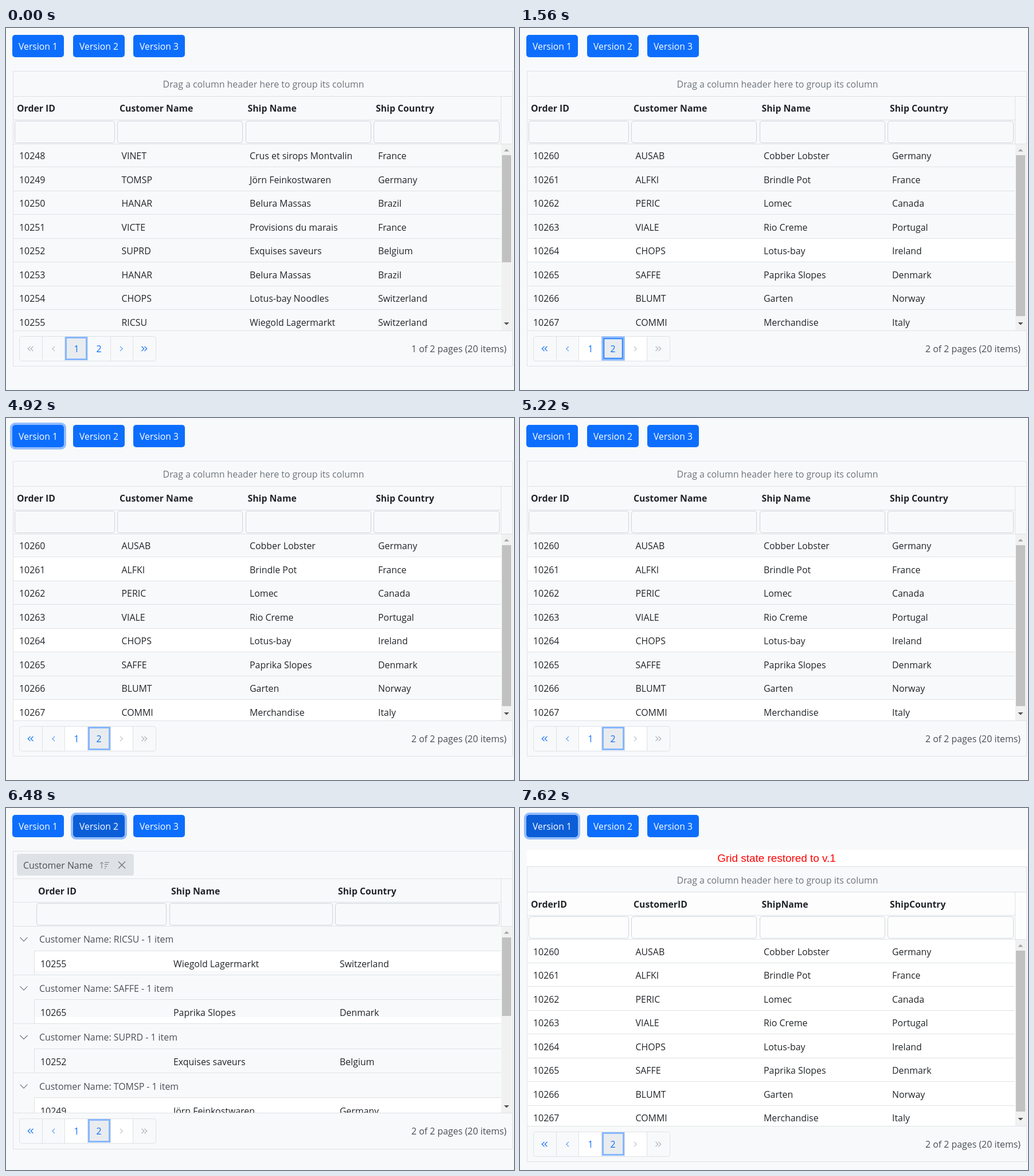
Animation, 886 px wide and 632 px high, one loop 8 s. Source, as an HTML page:

```html
<!DOCTYPE html>
<html lang="en">
<head>
<meta charset="utf-8">
<title>Grid state</title>
<style>
html, body { margin: 0; width: 100%; height: 100%; overflow: hidden; background: #f8f9fa; }
svg { display: block; width: 886px; height: 632px; }
text { font: 15.9px "Open Sans", "Noto Sans", sans-serif; fill: #212529; }
.head { font-weight: 700; font-size: 15.8px; }
.mid { text-anchor: middle; }
.end { text-anchor: end; }
.muted { fill: #6c757d; }
.soft { fill: #495057; }
.link { fill: #0d6efd; }
.label { fill: #fff; font-size: 15.7px; }
.note { font: 18.9px "Liberation Sans", Arial, sans-serif; fill: #f00; }
</style>
</head>
<body>
<svg id="stage" viewBox="0 0 886 632"></svg>
<script>
const LINE = '#dee2e6', BLUE = '#0d6efd', DARK = '#0b5ed7', RING = '#86b7fe', GLOW = '#94bdfc';
const LOOP = 8000, STEP = 60;
const stage = document.getElementById('stage');

// Strokes sit on pixel centres and baselines on whole pixels.
const snap = v => Math.floor(v) + .5;
const text = (x, y, s, cls = '') => `<text x="${x}" y="${Math.round(y)}" class="${cls}">${s}</text>`;
const rect = (x, y, w, h, fill, extra = '') =>
  `<rect x="${x}" y="${y}" width="${w}" height="${h}" fill="${fill}" ${extra}/>`;
const path = (d, color = LINE, width = 1, extra = '') =>
  `<path d="${d}" fill="none" stroke="${color}" stroke-width="${width}" ${extra}/>`;
const hLine = (x1, x2, y) => path(`M${x1} ${snap(y)}H${x2}`);
const vLine = (x, y1, y2) => path(`M${snap(x)} ${y1}V${y2}`);
const frame = (x, y, w, h, r, color = LINE, fill = 'none') =>
  rect(snap(x), snap(y), w, h, fill, `rx="${r}" stroke="${color}"`);

const page1 = [
  ['VINET', 'Crus et sirops Montvalin', 'France'],
  ['TOMSP', 'Jörn Feinkostwaren', 'Germany'],
  ['HANAR', 'Belura Massas', 'Brazil'],
  ['VICTE', 'Provisions du marais', 'France'],
  ['SUPRD', 'Exquises saveurs', 'Belgium'],
  ['HANAR', 'Belura Massas', 'Brazil'],
  ['CHOPS', 'Lotus-bay Noodles', 'Switzerland'],
  ['RICSU', 'Wiegold Lagermarkt', 'Switzerland']
].map((r, i) => [10248 + i, ...r]);

const page2 = [
  ['AUSAB', 'Cobber Lobster', 'Germany'],
  ['ALFKI', 'Brindle Pot', 'France'],
  ['PERIC', 'Lomec', 'Canada'],
  ['VIALE', 'Rio Creme', 'Portugal'],
  ['CHOPS', 'Lotus-bay', 'Ireland'],
  ['SAFFE', 'Paprika Slopes', 'Denmark'],
  ['BLUMT', 'Garten', 'Norway'],
  ['COMMI', 'Merchandise', 'Italy']
].map((r, i) => [10260 + i, ...r]);

const grouped = [
  ['RICSU', 10255, 'Wiegold Lagermarkt', 'Switzerland'],
  ['SAFFE', 10265, 'Paprika Slopes', 'Denmark'],
  ['SUPRD', 10252, 'Exquises saveurs', 'Belgium'],
  ['TOMSP', 10249, 'Jörn Feinkostwaren', 'Germany']
];

function scrollbar(top, bottom, thumb) {
  return rect(864, top, 18, bottom - top, '#f1f1f1') +
    rect(865, top + 19, 16, thumb, '#c1c1c1') +
    `<path d="M868.5 ${top + 12.5}l4.5-4.5 4.5 4.5z" fill="#a3a3a3"/>` +
    `<path d="M868.5 ${bottom - 14}l4.5 4.5 4.5-4.5z" fill="#505050"/>`;
}

function chevron(x, y, dir, double, on) {
  const d = (double ? [-2.5, 2.5] : [0])
    .map(o => `M${x + o - dir * 2} ${y - 4.2}l${dir * 4.2} 4.2l${-dir * 4.2} 4.2`).join('');
  const color = double ? (on ? BLUE : '#a9b0b7') : (on ? '#5c9bfd' : '#bcc2c8');
  return path(d, color, 1.2);
}

const pageBox = (x, y, fill, color, width) =>
  rect(x + 1.5, y + 2.5, 36, 38, fill, `stroke="${color}" stroke-width="${width}"`);

// y is the top edge of the pager box
function pager(y, page) {
  const mid = y + 22, second = page === 2;
  let s = '';
  if (second) s += rect(103, y + 1, 39, 42, '#fff') + rect(183, y + 1, 38, 42, '#fff');
  s += frame(23, y, 238, 43, 4);
  for (const x of [63, 102, 142, 182, 221]) s += vLine(x, y, y + 44);
  s += pageBox(second ? 143 : 103, y, '#e9ecef', RING, 3);
  return s + chevron(43, mid, -1, true, second) + chevron(83, mid, -1, false, second) +
    chevron(201, mid, 1, false, !second) + chevron(241, mid, 1, true, !second) +
    text(123, mid + 6, 1, 'mid link') + text(162, mid + 6, 2, 'mid link') +
    text(873, mid + 6, `${page} of 2 pages (20 items)`, 'end soft');
}

const inputs = (spans, y, fill = '#f8f9fa') =>
  spans.map(([a, b]) => frame(a, y, b - a, 38, 4, '#ced4da', fill)).join('');

const headX = [19, 198, 421.5, 645], cellX = [23, 201.5, 425, 649];

function flatGrid(rows, page, heads, thumb, dy = 0, fill) {
  const top = Math.floor(dy);
  let s = frame(12, 75 + top, 871, 515, 0) +
    text(449, 104 + dy, 'Drag a column header here to group its column', 'mid muted') +
    hLine(12, 884, 119 + dy) + hLine(12, 863, 160 + dy) + hLine(12, 884, 202 + dy) +
    vLine(863, 119 + top, 202 + top) +
    heads.map((h, i) => text(headX[i], 146 + dy, h, 'head')).join('') +
    inputs([[15, 189], [194, 412], [418, 636], [641, 860]], 162 + dy, fill);
  rows.forEach((r, i) => {
    const y = 41.55 * i + dy;
    s += r.map((c, k) => text(cellX[k], 229 + y, c)).join('');
    if (i < 7) s += hLine(12, 863, 242.5 + y);
  });
  return s + scrollbar(203 + top, 528 + top, thumb) + hLine(12, 884, 528 + dy) + pager(538 + top, page);
}

function groupGrid() {
  let s = frame(12, 75, 871, 520, 0) + rect(19, 80, 204, 38, LINE, 'rx="4"') +
    text(30, 106, 'Customer Name', 'soft') +
    path('M167 105.5V94.5m-3 3l3-3 3 3M172 95h8M172 98.5h6M172 102h4M172 105.5h2', '#6c757d', 1) +
    path('M196 93.5l12 12m0-12l-12 12', '#343a40', 1.3, 'id="close"') +
    hLine(12, 884, 123) + hLine(12, 863, 164) + hLine(12, 884, 206) + vLine(863, 124, 206) +
    text(56, 151, 'Order ID', 'head') + text(288, 151, 'Ship Name', 'head') +
    text(579, 151, 'Ship Country', 'head') +
    inputs([[53, 279], [285, 569], [574, 860]], 166);
  s += rect(49, 250, 814, 34, '#fff') + rect(49, 365, 814, 11, '#fff') + rect(49, 507, 814, 26, '#fff');
  s += '<g clip-path="url(#body)">';
  grouped.forEach(([code, id, name, land], i) => {
    const y = 229 + 85.6 * i, edge = Math.floor(y + 20);
    s += path(`M24.5 ${y - 3.2}l6.5 6.5 6.5-6.5`, '#6c757d', 1.2) +
      text(58, y + 6, `Customer Name: ${code} - 1 item`, 'soft') +
      hLine(49, 863, edge) + vLine(49, edge, edge + 42) + hLine(12, 863, edge + 42) +
      text(60, y + 48.7, id) + text(292, y + 48.7, name) + text(582, y + 48.7, land);
  });
  return s + '</g>' + scrollbar(207, 533, 137) + hLine(12, 884, 532) + pager(542, 2);
}

const buttons = [11, 117, 222].map((x, i) =>
  rect(x - 2, 10, 94, 43, 'none', `id="ring${i}" rx="7" stroke="${GLOW}" stroke-width="4"`) +
  rect(x, 12, 90, 39, BLUE, `id="btn${i}" rx="5"`) +
  text(x + 45, 38, `Version ${i + 1}`, 'mid label')).join('');

const titles = ['Order ID', 'Customer Name', 'Ship Name', 'Ship Country'];
const fields = ['OrderID', 'CustomerID', 'ShipName', 'ShipCountry'];
const layer = (id, s) => `<g id="${id}">${s}</g>`;

stage.innerHTML =
  '<defs><clipPath id="body"><rect x="12" y="207" width="852" height="326"/></clipPath></defs>' +
  rect(0, 0, 886, 632, '#f8f9fa') +
  layer('row5', rect(13, 368, 850, 41, '#fff')) +
  layer('rows28', rect(13, 243, 850, 42, '#fff') + rect(13, 492, 850, 36, '#fff')) +
  layer('first', flatGrid(page1, 1, titles, 187)) +
  layer('second', flatGrid(page2, 2, titles, 281)) +
  layer('groups', groupGrid()) +
  layer('restored', rect(12, 73, 872, 28, '#fff') + rect(13, 148, 870, 81, '#fdfdfe') +
    rect(13, 229, 850, 327, '#fff') + text(447.5, 94, 'Grid state restored to v.1', 'mid note') +
    flatGrid(page2, 2, fields, 281, 27.5, '#fdfdfe')) +
  layer('hover2', rect(143, 539, 39, 42, '#e9ecef') + text(162, 566, 2, 'mid link')) +
  layer('focus2', pageBox(143, 538, 'none', RING, 4) +
    rect(146.5, 542.5, 32, 34, 'none', `stroke="${BLUE}" stroke-width="1.3"`)) +
  buttons;

const el = {};
stage.querySelectorAll('[id]').forEach(n => el[n.id] = n);

const clamp = v => Math.max(0, Math.min(1, v));
const ramp = (t, start, n) => clamp((Math.floor((t - start) / STEP) + 1) / n);
const fade = (t, start, n) => 1 - clamp(Math.floor((t - start) / STEP) / (n - 1));
const during = (t, a, b) => t >= a && t < b;
const show = (id, on) => el[id].setAttribute('visibility', on ? 'visible' : 'hidden');

function render(t) {
  show('first', t < 1560);
  show('second', during(t, 1560, 5460));
  show('groups', during(t, 5460, 7500));
  show('restored', t >= 7500);
  show('row5', during(t, 360, 5460));
  show('rows28', during(t, 1920, 5460));
  show('hover2', during(t, 480, 1560));
  show('focus2', during(t, 1080, 2880));

  const ring0 = t < 4920 ? ramp(t, 2880, 5) : t < 7380 ? fade(t, 4920, 6) : ramp(t, 7380, 5);
  const ring1 = t < 7380 ? ramp(t, 6360, 3) : fade(t, 7380, 3);
  el.ring0.setAttribute('opacity', ring0);
  el.ring1.setAttribute('opacity', ring1);
  el.ring2.setAttribute('opacity', 0);
  el.btn0.setAttribute('fill', during(t, 2580, 4920) || t >= 6960 ? DARK : BLUE);
  el.btn1.setAttribute('fill', during(t, 5820, 7380) ? DARK : BLUE);
  el.close.setAttribute('stroke', t < 5820 ? '#343a40' : '#6c757d');
}

const begin = performance.now();
function tick() {
  render((performance.now() - begin) % LOOP);
  requestAnimationFrame(tick);
}
tick();
</script>
</body>
</html>
```
